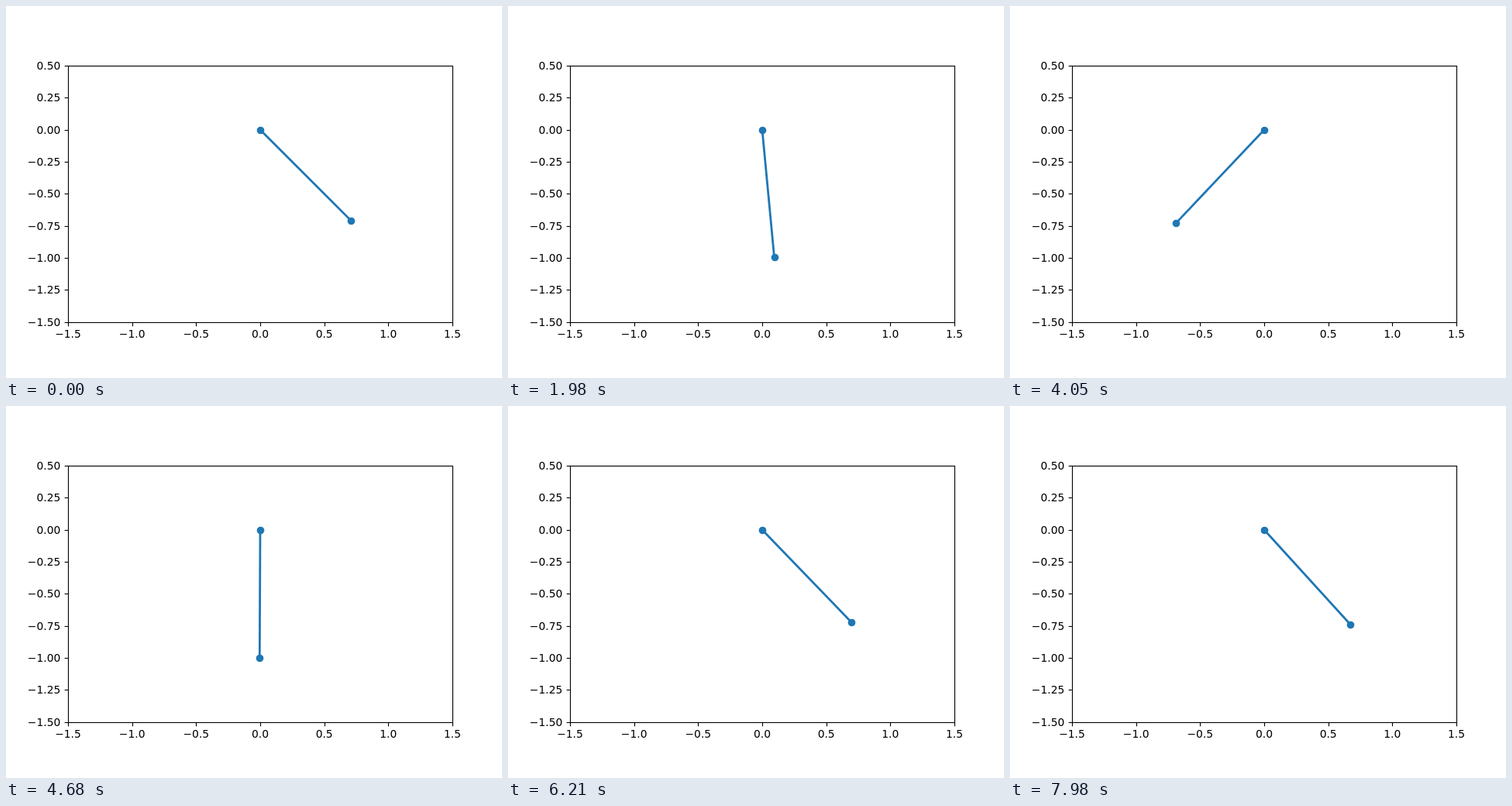
These frames come from a looping animation (640x480 px, 8 s). An HTML page:

```html
<!DOCTYPE html>
<html lang="en">
<head>
<meta charset="utf-8">
<title>Pendulum</title>
<style>
  html, body { margin: 0; width: 100%; height: 100%; overflow: hidden; background: #fff; }
  svg { display: block; }
  text { font: 13.89px "DejaVu Sans", sans-serif; }
  .axes { fill: none; stroke: #000; stroke-width: 1.11; }
  #rod { stroke: #1f77b4; stroke-width: 2.78; }
  circle { fill: #1f77b4; }
</style>
</head>
<body>
<svg id="stage" width="640" height="480" viewBox="0 0 640 480">
  <rect class="axes" x="80.5" y="77.5" width="496" height="331"/>
  <line id="rod"/>
  <circle id="pivot" r="4.86"/>
  <circle id="bob" r="4.86"/>
</svg>
<script>
const LOOP = 8000, STEP = 30;
const UNIT = 496 / 3;
const toX = x => 328 + UNIT * x;
const toY = y => 159.73 - UNIT * y;
const snap = v => Math.round(v) + 0.5;

const byId = id => document.getElementById(id);
const set = (el, attrs) => {
  for (const name in attrs) el.setAttribute(name, attrs[name]);
  return el;
};
const add = (tag, attrs) => byId("stage").appendChild(
  set(document.createElementNS("http://www.w3.org/2000/svg", tag), attrs));
const label = (value, digits, attrs) => {
  add("text", attrs).textContent = value.toFixed(digits).replace("-", "\u2212");
};

for (let x = -1.5; x <= 1.5; x += 0.5) {
  add("path", { class: "axes", d: `M${snap(toX(x))} 408.5v4.86` });
  label(x, 1, { x: toX(x), y: 428, "text-anchor": "middle" });
}
for (let y = -1.5; y <= 0.5; y += 0.25) {
  add("path", { class: "axes", d: `M80.5 ${snap(toY(y))}h-4.86` });
  label(y, 2, { x: 70.3, y: Math.round(toY(y)) + 5, "text-anchor": "end" });
}

// Semi-implicit Euler pendulum; PULL is gravity / length * dt².
const PULL = 0.04793;
const angles = [];
let angle = Math.PI / 4, speed = 0;
for (let i = 0; i * STEP < LOOP; i++) {
  angles.push(angle);
  speed -= PULL * Math.sin(angle);
  angle += speed;
}

set(byId("pivot"), { cx: snap(toX(0)), cy: snap(toY(0)) });
set(byId("rod"), { x1: toX(0), y1: toY(0) });

function draw(time) {
  const a = angles[Math.floor(time % LOOP / STEP)];
  const x = toX(Math.sin(a)), y = toY(-Math.cos(a));
  set(byId("rod"), { x2: x, y2: y });
  set(byId("bob"), { cx: snap(x), cy: snap(y) });
}

const start = performance.now();
function tick() {
  draw(performance.now() - start);
  requestAnimationFrame(tick);
}
tick();
</script>
</body>
</html>
```
